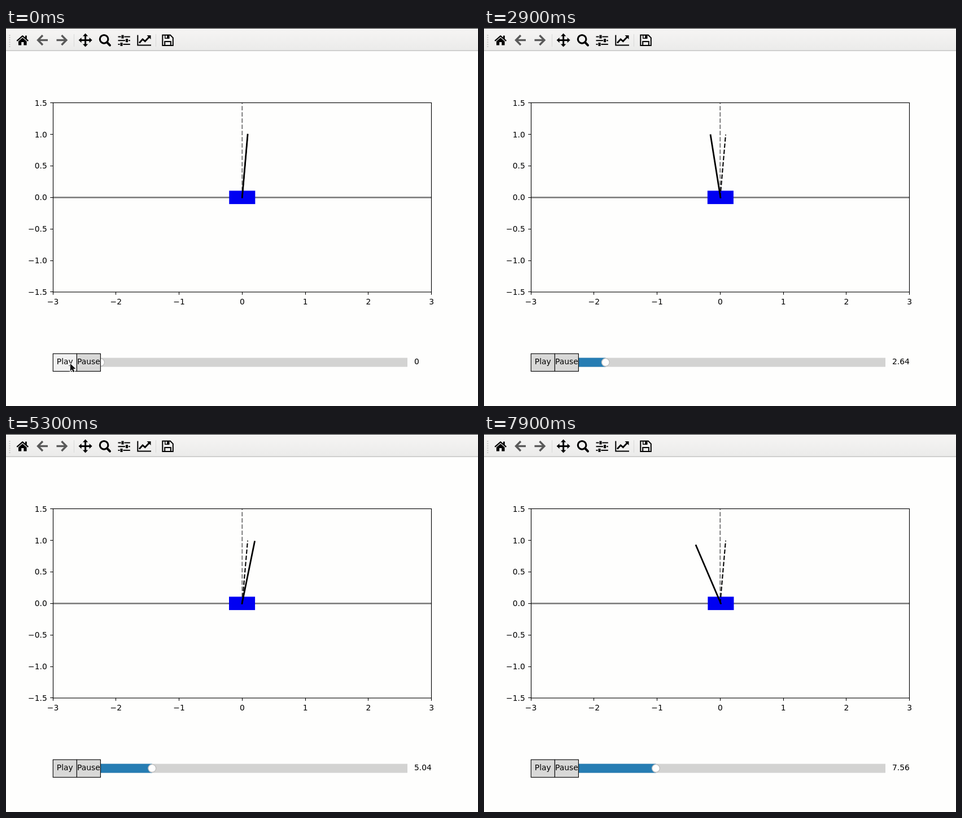
An HTML page with a canvas that plays this animation: 836x670 px, repeating every 8 s.

```html
<!DOCTYPE html>
<html lang="en">
<head>
<meta charset="utf-8">
<title>Cart and pole</title>
<style>
html, body { margin: 0; width: 100%; height: 100%; overflow: hidden; background: #fefefd; }
canvas { display: block; }
</style>
</head>
<body>
<canvas id="stage" width="836" height="670"></canvas>
<script>
const ctx = document.getElementById('stage').getContext('2d');
const LOOP = 8000, STEP = 0.04;
const UNIT = 111.75, OX = 418.3, OY = 300.3;
const AXES = { l: 83.2, r: 753.6, t: 132.7, b: 467.9 };
const SLIDER = { l: 167.5, r: 711, y: 592.6, max: 30 };
const START = 5 * Math.PI / 180, OMEGA = 3.881, RECOIL = 0.021;

// [ms, simulated seconds]
const CLOCK = [[200, 0], [300, 0.04], [1600, 1.28], [2000, 1.72], [2900, 2.64], [3700, 3.44],
  [5100, 4.84], [5300, 5.04], [6100, 5.88], [6600, 6.36], [7500, 7.2], [7900, 7.56]];
const HELD = [200, 5200, 6700, 7600];
// [ms, x, y] of the pointer tip
const POINTER = [[0, 113, 594], [700, 113, 594], [1100, 104, 620], [1600, 87, 646],
  [1800, 50, 656], [1900, 18, 663], [2000, 12, 690]];

// Angles from the upright, one per slider step
const angles = (() => {
  const list = [START], sub = 80, dt = STEP / sub;
  let a = START, v = 0;
  while (list.length < 200) {
    for (let i = 0; i < sub; i++) {
      v += OMEGA * OMEGA * Math.sin(a) * dt / 2;
      a += v * dt;
      v += OMEGA * OMEGA * Math.sin(a) * dt / 2;
    }
    list.push(a);
  }
  return list;
})();

function track(keys, t, col) {
  if (t <= keys[0][0]) return keys[0][col];
  for (let i = 1; i < keys.length; i++) {
    const a = keys[i - 1], b = keys[i];
    if (t <= b[0]) return a[col] + (b[col] - a[col]) * (t - a[0]) / (b[0] - a[0]);
  }
  return keys[keys.length - 1][col];
}

function box(x, y, w, h, fill) {
  ctx.fillStyle = fill;
  ctx.fillRect(x, y, w, h);
}

function path(points, close) {
  ctx.beginPath();
  points.forEach(([x, y]) => ctx.lineTo(x, y));
  if (close) ctx.closePath();
}

function line(points, color, width, dash = [], cap = 'butt') {
  path(points);
  ctx.strokeStyle = color;
  ctx.lineWidth = width;
  ctx.lineCap = cap;
  ctx.setLineDash(dash);
  ctx.stroke();
  ctx.setLineDash([]);
}

function poly(points, fill) {
  path(points, true);
  ctx.fillStyle = fill;
  ctx.fill();
}

function label(text, x, y, align) {
  ctx.font = '13.89px "DejaVu Sans", sans-serif';
  ctx.textAlign = align;
  ctx.fillStyle = '#000';
  ctx.fillText(text, x, y);
}

function arrow(x, dir) {
  const gray = '#595959';
  line([[x + 9 * dir, 21.5], [x - 8 * dir, 21.5]], gray, 3.4);
  line([[x, 13], [x - 8.4 * dir, 21.5], [x, 30]], gray, 3.4);
}

function moveIcon(x, y) {
  line([[x - 9, y], [x + 9, y]], '#000', 3);
  line([[x, y - 9], [x, y + 9]], '#000', 3);
  for (let i = 0; i < 4; i++) {
    const c = Math.cos(i * Math.PI / 2), s = Math.sin(i * Math.PI / 2);
    poly([[12, 0], [7, -4.7], [7, 4.7]].map(([u, v]) => [x + u * c - v * s, y + u * s + v * c]), '#000');
  }
}

function toolbar() {
  const shade = ctx.createLinearGradient(0, 1, 0, 40);
  shade.addColorStop(0, '#f6f5f4');
  shade.addColorStop(1, '#ebebea');
  box(0, 0, 836, 40, shade);
  box(0, 0, 836, 1, '#202020');
  box(0, 39.5, 836, 1.2, '#b9b9b8');
  for (let y = 12; y < 33; y += 4) box(5.5, y, 2, 2, '#c9c9c8');
  box(120, 11, 1, 22, '#d9d9d8');
  box(265, 11, 1, 22, '#d9d9d8');

  line([[19.3, 22.8], [29.3, 14.2], [39.3, 22.8]], '#000', 2.3);
  box(34, 13.5, 2.8, 5.5, '#000');
  poly([[29.3, 17.3], [36.6, 23.5], [36.6, 30.5], [31.4, 30.5], [31.4, 25],
    [27.2, 25], [27.2, 30.5], [22, 30.5], [22, 23.5]], '#000');

  arrow(65, 1);
  arrow(98.5, -1);
  moveIcon(140.6, 21.6);

  ctx.beginPath();
  ctx.arc(173.6, 19.8, 7.3, 0, 7);
  ctx.lineWidth = 3.1;
  ctx.strokeStyle = '#000';
  ctx.stroke();
  line([[178.8, 25.2], [184, 30.6]], '#000', 4, [], 'round');

  [[15.5, 206.5], [22.2, 214], [28.9, 204.5]].forEach(([y, x]) => {
    line([[198.5, y], [219.8, y]], '#000', 2);
    box(x - 3, y - 3, 6, 6, '#eeeeed');
    box(x - 2, y - 3, 4, 6, '#000');
  });

  line([[233.3, 12.5], [233.3, 30.5], [257, 30.5]], '#000', 2);
  line([[236, 26.5], [242, 20], [246.3, 23.5], [254, 15.5]], '#000', 2.8);
  poly([[249.5, 13], [256.5, 13], [256.5, 20]], '#000');

  path([[277.3, 12.5], [291, 12.5], [295.8, 17.3], [295.8, 31], [277.3, 31]], true);
  ctx.lineWidth = 2;
  ctx.stroke();
  ctx.strokeRect(281.2, 24, 10.6, 7);
  box(281, 12, 8.5, 7, '#000');
  box(282.4, 13.5, 2.8, 4, '#eeeeed');
}

function plot(angle) {
  const { l, r, t, b } = AXES;
  const cart = OX + RECOIL * (Math.sin(START) - Math.sin(angle)) * UNIT;
  const tip = (x, a) => [x + UNIT * Math.sin(a), OY - UNIT * Math.cos(a)];
  const dash = [7.7, 3.33];

  line([[l, OY], [r, OY]], '#808080', 2.78);
  line([[OX, OY], [OX, t]], '#808080', 2.08, dash);
  box(cart - 23.05, OY - 11.9, 46.1, 23.7, '#0000f2');
  line([[OX, OY], tip(OX, START)], '#000', 2.08, dash);
  line([[cart, OY], tip(cart, angle)], '#000', 2.78, [], 'square');

  ctx.strokeStyle = '#000';
  ctx.lineWidth = 1.11;
  ctx.strokeRect(83.5, 132.5, 670, 335.5);
  const name = (v, digits) => v.toFixed(digits).replace('-', '\u2212');
  for (let i = -3; i <= 3; i++) {
    const x = Math.floor(OX + i * UNIT) + 0.5, y = Math.floor(OY - i * UNIT / 2) + 0.5;
    line([[x, b], [x, b + 4.9]], '#000', 1.11);
    line([[l, y], [l - 4.9, y]], '#000', 1.11);
    label(name(i, 0), OX + i * UNIT, 489.5, 'center');
    label(name(i / 2, 1), 72.8, OY - i * UNIT / 2 + 5, 'right');
  }
}

function button(text, x, w, fill) {
  box(x, 577.3, w, 31.2, fill);
  ctx.strokeStyle = '#000';
  ctx.lineWidth = 1.11;
  ctx.strokeRect(x, 577.3, w, 31.2);
  label(text, x + w / 2, 596, 'center');
}

function controls(value, hover) {
  const { l, r, y, max } = SLIDER;
  const x = l + (r - l) * value / max;
  box(l, y - 8, r - l, 16, '#d3d3d2');
  box(l, y - 8, x - l, 16, '#267db3');
  ctx.beginPath();
  ctx.arc(x, y, 6.95, 0, 7);
  ctx.fillStyle = '#fefefe';
  ctx.fill();
  ctx.strokeStyle = '#bfbfbf';
  ctx.lineWidth = 1.39;
  ctx.stroke();
  label(String(+value.toFixed(2)), 723, 596, 'left');
  button('Pause', 125.3, 42.1, '#d8d8d7');
  button('Play', 83.3, 42, hover ? '#f1f1f1' : '#d8d8d7');
}

function pointer(x, y) {
  path([[0, 0], [0, 13.2], [3, 10.4], [5.2, 15.2], [7.6, 14.1], [5.4, 9.4], [9.6, 9.2]]
    .map(([u, v]) => [x + 0.8 + u, y + 0.8 + v]), true);
  ctx.lineJoin = 'round';
  ctx.strokeStyle = '#fff';
  ctx.lineWidth = 2;
  ctx.stroke();
  ctx.fillStyle = '#111';
  ctx.fill();
  ctx.lineJoin = 'miter';
}

function draw(ms) {
  let t = Math.floor(ms / 100) * 100;
  if (HELD.includes(t)) t -= 100;
  const step = Math.round(track(CLOCK, t, 1) / STEP);
  const px = track(POINTER, t, 1), py = track(POINTER, t, 2);
  box(0, 0, 836, 670, '#fefefd');
  toolbar();
  plot(angles[step]);
  controls(step * STEP, py < 608);
  if (t < 2000) pointer(px, py);
}

const begin = performance.now();
function tick() {
  draw((performance.now() - begin) % LOOP);
  requestAnimationFrame(tick);
}
tick();
</script>
</body>
</html>
```
